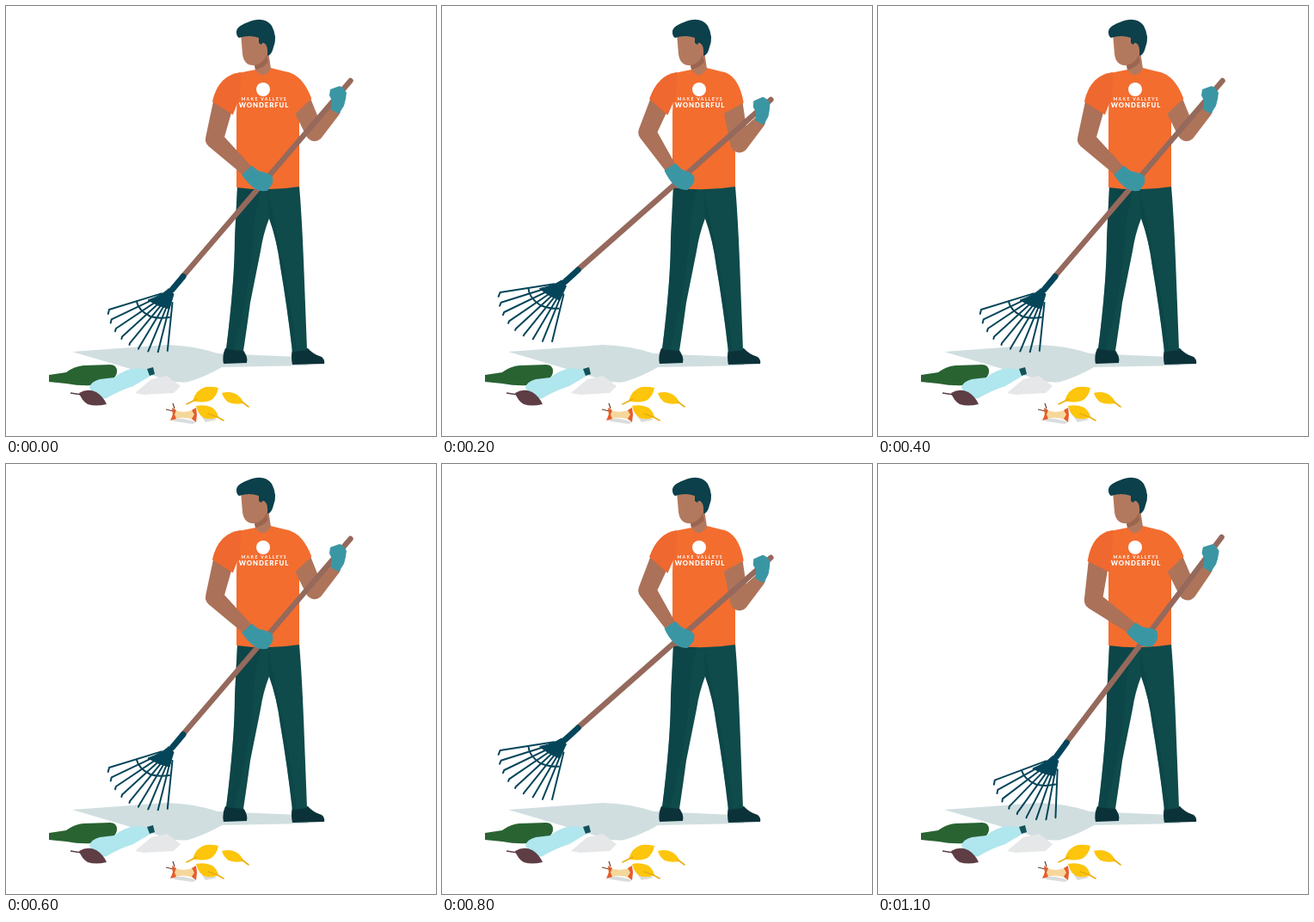
An HTML page that plays this animation: 500 px wide and 500 px high, repeating every 1200 ms.

```html
<!DOCTYPE html>
<html lang="en">
<head>
<meta charset="utf-8">
<title>Raking</title>
<style>
  html, body { margin: 0; width: 100%; height: 100%; overflow: hidden; background: #fff; }
  svg { display: block; width: 100vw; height: 100vh; }
  text { font-family: Lato, "Open Sans", sans-serif; fill: #fff; text-anchor: middle; }
</style>
</head>
<body>
<svg viewBox="0 0 500 500">
  <!-- ground -->
  <path fill="#d0dee0" d="M77 402L187 394Q220 395 246 404L340 408L352 418L300 419L251 420Q232 431 212 437Q200 439 185 434L128 417Z"/>
  <path fill="#e5e7e8" d="M150 450L169 434L187 430L203 442L195 450L160 452Z"/>
  <path fill="#296332" d="M50 429L70 426Q79 419 90 418L121 417Q129 417 129 425Q129 434 112 440Q90 443 70 439L50 437Z"/>
  <path fill="#b0e6ed" d="M97 444Q98 437 109 434L126 432Q138 422 152 421L165 423L168 430Q158 436 148 442Q132 447 117 456Q104 460 97 444Z"/>
  <path fill="#12535a" d="M164 422L171 420L173 428L167 430Z"/>
  <path fill="#5e3d45" d="M85 450Q95 444 105 449Q113 454 117 463Q104 466 95 463Q88 459 85 450Z"/>
  <path stroke="#5e3d45" stroke-width="1.7" d="M75 450L88 452"/>
  <g fill="#fdc50b">
    <path d="M217 459Q221 446 232 443Q240 442 247 444Q245 455 237 459Q227 462 217 459Z"/>
    <path d="M251 450Q262 447 270 453Q275 457 276 462Q266 464 259 461Q253 457 251 450Z"/>
    <path fill="#d9dcdc" d="M222 470L232 484L246 481Z"/>
    <path d="M221 465Q232 463 240 467Q246 472 247 478Q238 482 230 479Q223 474 221 465Z"/>
    <path fill="none" stroke="#e9ae10" stroke-width="1.6" stroke-linecap="round" d="M222 457L210 463M274 460L282 466M235 474L246 478L253 482"/>
  </g>
  <path fill="#d9dcdc" d="M191 480Q206 478 221 484L217 486L196 483Z"/>
  <path fill="#f6d79b" d="M194 469Q206 475 219 469L220 482Q207 476 193 481Z"/>
  <path fill="#e65c2c" d="M193 467L198 470L196 475L198 480L191 482L194 475ZM216 470L221 467L222 475L221 484L216 480L219 475Z"/>
  <path stroke="#6a4030" stroke-width="1.2" d="M186 469L194 471M194 462L196 468"/>

  <!-- legs -->
  <path fill="#0c3239" d="M255 398L274 398Q282 407 280 415L253 416Q251 407 255 398ZM333 399L351 398Q357 405 367 408Q371 411 370 416L333 417Q331 408 333 399Z"/>
  <path fill="#0f4b4b" d="M269 210L341 209Q344 245 346 295L350 400L333 402Q327 350 319 303Q315 272 306 247Q299 265 296 285L284 345Q280 375 276 401L256 399Q266 320 266 270Z"/>
  <path fill="#0d4347" opacity=".6" d="M305 217L306 247Q315 272 319 303Q327 350 333 402L338 401Q329 330 316 270ZM269 211L297 211Q288 240 287 280Q281 340 265 400L256 399Q266 320 266 270Z"/>

  <!-- torso and head -->
  <path fill="#f36d2f" d="M270 78L290 74L308 72L328 77Q338 80 341 96L341 210Q305 216 268 211L268 125Z"/>
  <path fill="#b3795e" d="M273 32L275 56Q277 70 289 69L290 74Q299 87 308 73L304 46L297 30Z"/>
  <path fill="#9b6550" d="M289 69Q299 67 303 57L305 65Q299 72 290 74Z"/>
  <path fill="#0c404b" d="M268 31Q267 24 281 19Q300 11 309 23Q316 36 311 48Q309 57 304 58Q305 45 300 43Q298 42 297 45L294 43L294 37Q283 33 271 37Q268 35 268 31Z"/>

  <path id="armR" fill="#ae745a"/>
  <path id="sleeveR" fill="#f36d2f"/>
  <path id="armL" fill="#ab7159"/>
  <path id="sleeveL" fill="#ee682f"/>

  <circle cx="299" cy="97" r="8" fill="#fff"/>
  <text x="300.2" y="110.2" font-size="5.1" font-weight="700" letter-spacing="1.4">MAKE VALLEYS</text>
  <text x="300" y="118.2" font-size="7.8" font-weight="900" letter-spacing=".9">WONDERFUL</text>

  <!-- rake: origin at the top of the handle -->
  <g id="rake" fill="none" stroke-linecap="round" stroke-linejoin="round">
    <path stroke="#95695c" stroke-width="6.4" d="M-1.5 1L-196 228"/>
    <g stroke="#04455a" stroke-width="2">
      <path id="tines"/>
      <path d="M-250 258Q-248 268 -234 275Q-224 278 -212 276"/>
      <path stroke-width="7" d="M-196 228.5L-209 244"/>
      <path fill="#04455a" stroke-width="1" d="M-213 243L-207 249L-212 266Q-226 263 -237 256Q-222 251 -213 243Z"/>
    </g>
  </g>
  <!-- gloves: origin at the wrist -->
  <path id="handR" fill="#3b96a4" d="M-4.500 -2L-3 -12L-6 -18L-5 -25Q0 -27 6 -29Q11 -27 14 -21Q13 -12 11 -6L5 3.500Z"/>
  <path id="handL" fill="#3b96a4" d="M5 -6L14 -1Q23 -1 30 2Q33 8 31 13L27 20Q19 23 11 19Q3 15 -5 6Z"/>
</svg>
<script>
const STEP = 100, STEPS = 6;

// from the widest reach to the closest one: handle top, rake turn, wrists
const POSES = [
  { top: [384, 108], turn: 8, left: [265, 187], right: [369, 135] },
  { top: [396, 92.5], turn: 2.8, left: [268, 191], right: [380, 119] },
  { top: [402, 86], turn: 0, left: [280, 191], right: [382, 122] },
  { top: [401, 84], turn: -3.5, left: [294, 190], right: [382, 122] }
];

const get = id => document.getElementById(id);
const draw = (id, d) => get(id).setAttribute("d", d);
const place = (id, at, turn) => get(id).setAttribute("transform", `translate(${at}) rotate(${turn})`);
const angle = (a, b) => Math.atan2(b[1] - a[1], b[0] - a[0]);
const polar = ([x, y], a, r) => [x + r * Math.cos(a), y + r * Math.sin(a)];
const off = (p, a, along, across) => polar(polar(p, a, along), a + Math.PI / 2, across);

// two-bone arm: side is -1 for the left elbow, 1 for the right one
function findElbow(shoulder, wrist, upper, fore, side) {
  const d = Math.hypot(wrist[0] - shoulder[0], wrist[1] - shoulder[1]);
  const along = (upper ** 2 - fore ** 2 + d ** 2) / (2 * d);
  return off(shoulder, angle(shoulder, wrist), along, Math.sqrt(Math.max(0, upper ** 2 - along ** 2)));
}

const taper = (a, ra, b, rb) => {
  const t = angle(a, b);
  return `M${off(a, t, 0, ra)}L${off(b, t, 0, rb)}A${rb} ${rb} 0 0 0 ${off(b, t, 0, -rb)}L${off(a, t, 0, -ra)}Z`;
};

function drawArm(name, side, shoulder, wrist, upper, fore, collar, armpit) {
  const elbow = findElbow(shoulder, wrist, upper, fore);
  const t = angle(shoulder, elbow);
  const hemOut = off(shoulder, t, 23, -13 * side), hemIn = off(shoulder, t, 32, 14 * side);
  const crown = [shoulder[0] + 11 * side, shoulder[1] - 12];
  draw("arm" + name, taper(off(shoulder, t, 20, 0), 12, elbow, 10.5) + taper(elbow, 10.5, wrist, 7));
  draw("sleeve" + name, `M${collar}Q${crown} ${hemOut}L${hemIn}L${armpit}Z`);
  return angle(elbow, wrist) * 180 / Math.PI;
}

function show({ top, turn, left, right }) {
  const reach = 1 - turn / 100;
  const forearm = drawArm("L", -1, [258 + Math.abs(turn) / 2, 92], left, 65 * reach, 52 * reach, [273, 77], [272, 105]);
  drawArm("R", 1, [334, 92], right, 60 + 0.14 * turn ** 2, 34, [326, 76.5], [318, 100]);
  place("rake", top, turn);
  place("handL", left, (forearm - 31) * 0.65);
  place("handR", right, -turn / 2);
}

// nine tines fan out from the socket; the outer ones end in a hook
let tines = "";
for (let i = 0; i < 9; i++) {
  const a = (163 - 8.4 * i) * Math.PI / 180, hub = [-207, 244];
  const hook = Math.max(0, 5 - i * 0.8);
  tines += `M${polar(hub, a, 15)}L${polar(hub, a, 81 - 0.35 * (i - 2.7) ** 2)}l${-hook / 4} ${hook}`;
}
draw("tines", tines);

let shown = -1;
const start = performance.now();
function tick() {
  const step = Math.floor((performance.now() - start) / STEP) % STEPS;
  if (step !== shown) show(POSES[Math.abs(step - 2)]);
  shown = step;
  requestAnimationFrame(tick);
}
tick();
</script>
</body>
</html>
```
